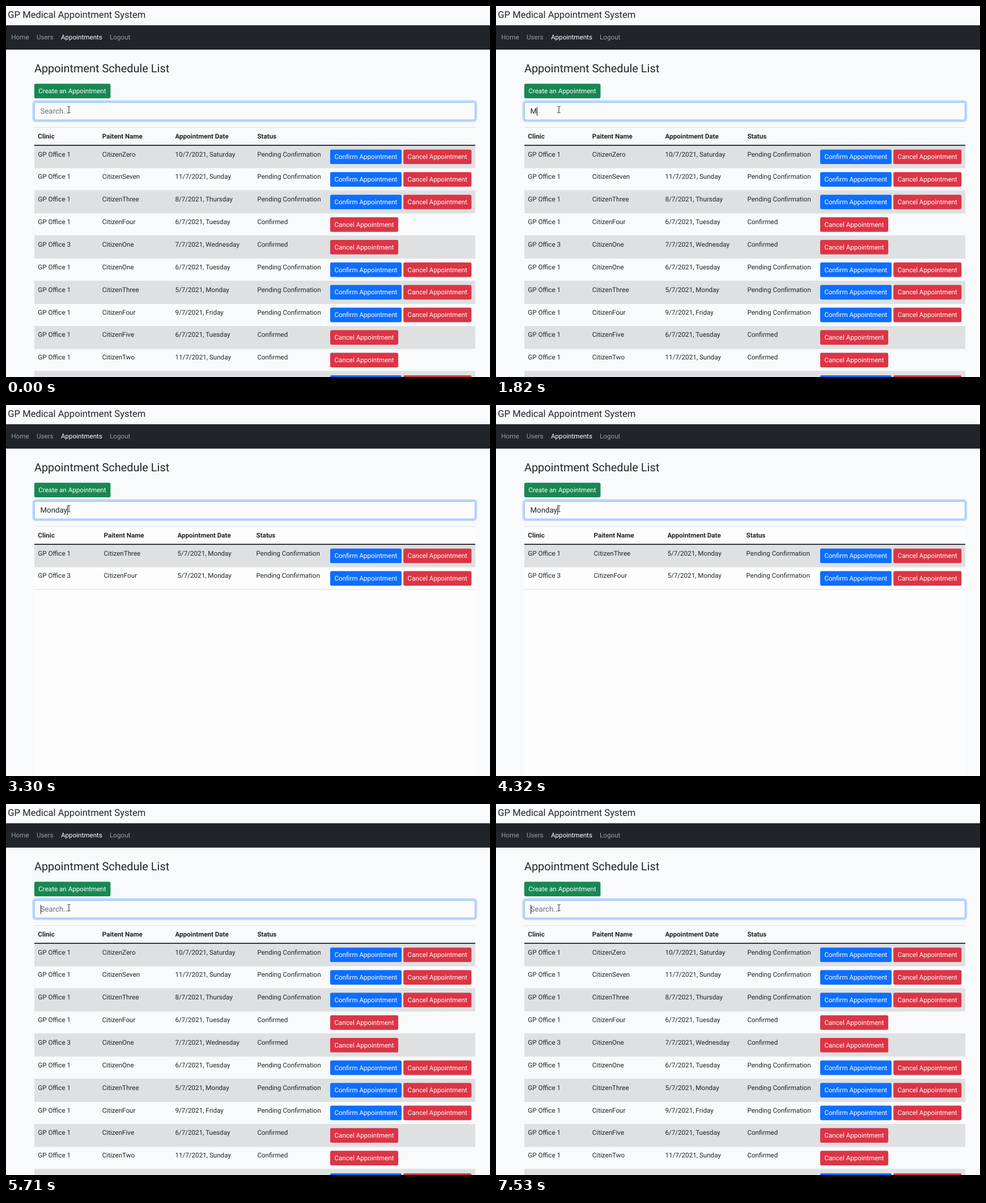
An HTML page that plays this animation: 854 by 655 pixels, repeating every 8000 ms.

```html
<!DOCTYPE html>
<html lang="en">
<head>
<meta charset="utf-8">
<title>Appointment list search</title>
<style>
  html, body { margin: 0; width: 100%; height: 100%; overflow: hidden; background: #f8fafc; }
  svg { display: block; width: 854px; height: 655px; }
  text { font-family: Roboto, Arial, sans-serif; font-size: 11.63px; fill: #212529; text-rendering: geometricPrecision; white-space: pre; }
  .title { font-size: 16.6px; }
  .heading { font-size: 19.93px; }
  .field { font-size: 13.29px; }
  .head { font-weight: 700; }
  .nav { fill: #9b9d9f; }
  .light { fill: #fff; }
  .hint { fill: #6c757d; }
</style>
</head>
<body>
<svg id="stage" viewBox="0 0 854 655"></svg>
<script>
const LOOP = 8000;
const LEFT = 49.9, WIDTH = 778, ROWS_TOP = 246.6, ROW = 39.87;
const stage = document.getElementById('stage');

function add(parent, tag, attrs, content) {
  const node = document.createElementNS('http://www.w3.org/2000/svg', tag);
  for (const key in attrs) node.setAttribute(key, attrs[key]);
  if (content) node.textContent = content;
  parent.appendChild(node);
  return node;
}
const rect = (parent, x, y, width, height, fill, more) =>
  add(parent, 'rect', { x, y, width, height, fill, ...more });
const label = (parent, x, y, content, cls = '') =>
  add(parent, 'text', { x, y, class: cls }, content);

function button(parent, x, y, width, fill, content) {
  rect(parent, x, y, width, 25.7, fill, { rx: 2.7 });
  label(parent, x + 7.4, y + 16.8, content, 'light');
}

function table(columns, rows, back) {
  const group = add(stage, 'g', {});
  if (back) rect(group, 50, 215, WIDTH, 440, back);
  rect(group, 50, 214, WIDTH, 1, '#dee2e6');
  ['Clinic', 'Paitent Name', 'Appointment Date', 'Status'].forEach((name, i) =>
    label(group, columns[i], 234, name, 'head'));
  rows.forEach(([clinic, person, date, pending], i) => {
    const y = ROWS_TOP + i * ROW;
    if (i % 2 === 0) rect(group, 50, y, WIDTH, ROW, '#dee0e2');
    rect(group, 50, Math.round(y + ROW) - 1, WIDTH, 1, '#dee0e2');
    const cells = ['GP Office ' + clinic, 'Citizen' + person, date,
      pending ? 'Pending Confirmation' : 'Confirmed'];
    cells.forEach((cell, c) => label(group, columns[c], y + 18.9, cell));
    if (pending) button(group, 572, y + 6.8, 126, '#0d6efd', 'Confirm Appointment');
    button(group, pending ? 701.2 : 572, y + 6.8, 120.1, '#dc3545', 'Cancel Appointment');
  });
  rect(group, 50, 245, WIDTH, 1.8, '#212529');
  return group;
}

// Page header
label(stage, 3.3, 20.8, 'GP Medical Appointment System', 'title');
rect(stage, 0, 34, 854, 43, '#212529');
label(stage, 9.3, 59, 'Home', 'nav');
label(stage, 53.9, 59, 'Users', 'nav');
label(stage, 97, 59, 'Appointments', 'light');
label(stage, 183.1, 59, 'Logout', 'nav');
label(stage, LEFT, 117.3, 'Appointment Schedule List', 'heading');
button(stage, LEFT, 137.3, 134.5, '#198754', 'Create an Appointment');

// Both table states: clinic, person, date, awaiting confirmation
const fullTable = table([56.3, 169.8, 298.4, 443.4], [
  [1, 'Zero', '10/7/2021, Saturday', true],
  [1, 'Seven', '11/7/2021, Sunday', true],
  [1, 'Three', '8/7/2021, Thursday', true],
  [1, 'Four', '6/7/2021, Tuesday', false],
  [3, 'One', '7/7/2021, Wednesday', false],
  [1, 'One', '6/7/2021, Tuesday', true],
  [1, 'Three', '5/7/2021, Monday', true],
  [1, 'Four', '9/7/2021, Friday', true],
  [1, 'Five', '6/7/2021, Tuesday', false],
  [1, 'Two', '11/7/2021, Sunday', false],
  [1, 'Six', '8/7/2021, Thursday', true]
]);
const mondayTable = table([56.3, 172.5, 302.4, 441.6], [
  [1, 'Three', '5/7/2021, Monday', true],
  [3, 'Four', '5/7/2021, Monday', true]
], '#fdfdfd');

// Search field
rect(stage, 46.6, 166.6, 784.6, 38.2, '#bcd6fd', { rx: 6 });
const box = rect(stage, 50.3, 170.3, 777.2, 30.8, '#fafbfd', { rx: 3, stroke: '#86b7fe', 'stroke-width': 0.9 });
const query = label(stage, 60.5, 190.2, '', 'field');
const caret = rect(stage, 61, 178, 1, 16, '#212529');
add(stage, 'path', {
  d: 'M108.5 177.5h2M111.5 177.5h2M111 178v10.5M108.5 188.5h2M111.5 188.5h2',
  stroke: '#222', 'stroke-width': 1, fill: 'none'
});

const WORD = 'Monday';
const CARET_X = [61, 72, 80, 86, 94, 101, 108];
// start time, typed letters, caret shown
const STEPS = [
  [0, 0, 0], [430, 0, 1], [830, 0, 0], [1360, 0, 1],
  [1820, 1, 1], [1940, 2, 1], [2060, 3, 1], [2620, 3, 0],
  [2900, 4, 1], [3020, 5, 1], [3300, 6, 1], [3890, 6, 0], [4320, 6, 1],
  [4910, 5, 1], [5470, 3, 1], [5590, 2, 1], [5710, 0, 1],
  [5860, 0, 0], [6510, 0, 1], [6940, 0, 0], [7530, 0, 1]
];

const show = (node, on) => node.setAttribute('visibility', on ? 'visible' : 'hidden');

function draw(time) {
  const [, typed, caretOn] = STEPS.filter(step => step[0] <= time).pop();
  const filtered = typed > 1;
  query.textContent = typed ? WORD.slice(0, typed) : 'Search...';
  query.setAttribute('class', typed ? 'field' : 'field hint');
  caret.setAttribute('x', CARET_X[typed]);
  show(caret, caretOn);
  show(fullTable, !filtered);
  show(mondayTable, filtered);
  box.setAttribute('fill', filtered ? '#fdfdfd' : '#fafbfd');
}

const start = performance.now();
function tick() {
  draw((performance.now() - start) % LOOP);
  requestAnimationFrame(tick);
}
tick();
</script>
</body>
</html>
```
